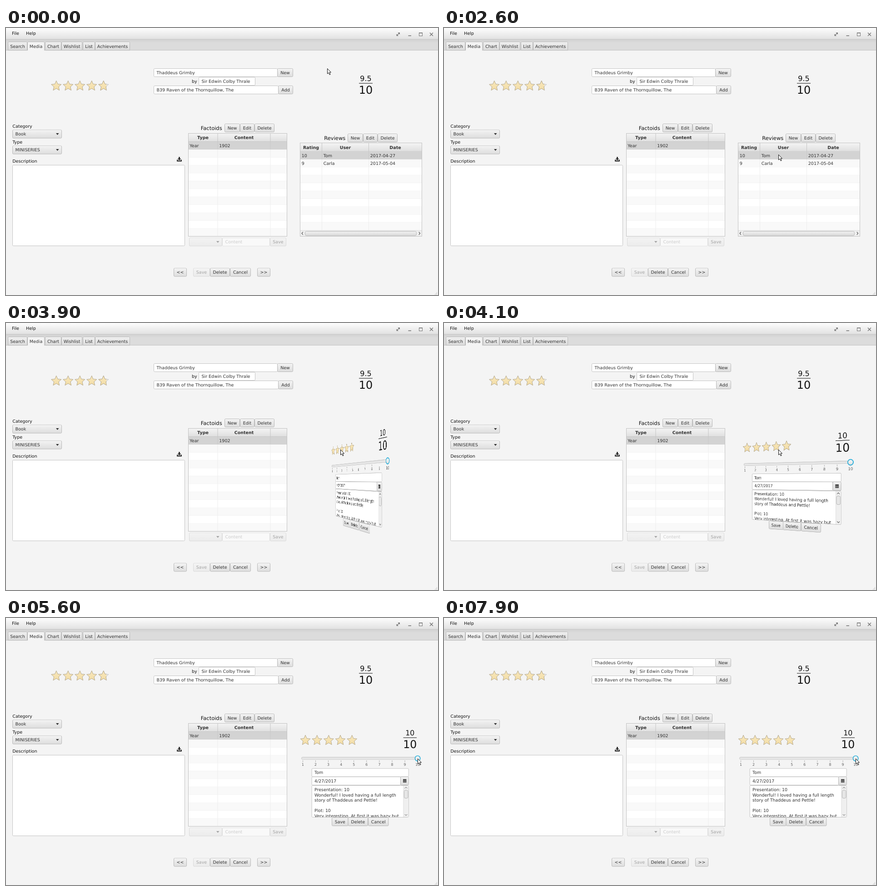
Write an HTML page with a canvas that moves like this. It is 951x589 px and loops after 8 s.

```html
<!DOCTYPE html>
<html lang="en">
<head>
<meta charset="utf-8">
<title>Media review form</title>
<style>
html, body { margin: 0; width: 100%; height: 100%; overflow: hidden; background: #f4f4f4; }
canvas { display: block; }
</style>
</head>
<body>
<canvas id="stage" width="951" height="589"></canvas>
<script>
const LOOP = 8000, STEP = 100;
const INK = '#323232', BLUE = '#2fb0da', FONT = '"DejaVu Sans", sans-serif';
const PANEL = { x: 647, y: 233, w: 269, h: 227 };
const ROW = 17.4;

const stage = document.getElementById('stage').getContext('2d');
const sheet = document.createElement('canvas');
sheet.width = PANEL.w * 2;
sheet.height = PANEL.h * 2;
const sheetCtx = sheet.getContext('2d');
let c = stage;

// ---------- basics ----------
function text(s, x, y, { size = 9.5, align = 'left', color = '#111', bold = false } = {}) {
  c.font = (bold ? 'bold ' : '') + size + 'px ' + FONT;
  c.textRendering = 'geometricPrecision';
  c.textAlign = align;
  c.fillStyle = color;
  c.fillText(s, x, y + size * 0.365);
}

function vgrad(y0, y1, ...colors) {
  const g = c.createLinearGradient(0, y0, 0, y1);
  colors.forEach((col, i) => g.addColorStop(i / (colors.length - 1), col));
  return g;
}

function rect(x0, y0, x1, y1, fill) {
  c.fillStyle = fill;
  c.fillRect(x0, y0, x1 - x0, y1 - y0);
}

function box(x0, y0, x1, y1, fill, edge = '#bdbdbd', r = 2) {
  c.beginPath();
  c.roundRect(x0 + 0.5, y0 + 0.5, x1 - x0 - 1, y1 - y0 - 1, r);
  c.fillStyle = fill;
  c.fill();
  c.strokeStyle = edge;
  c.lineWidth = 1;
  c.stroke();
}

function line(color, width, ...pts) {
  c.beginPath();
  for (let i = 0; i < pts.length; i += 2) c.lineTo(pts[i], pts[i + 1]);
  c.strokeStyle = color;
  c.lineWidth = width;
  c.stroke();
}

function poly(color, ...pts) {
  c.beginPath();
  for (let i = 0; i < pts.length; i += 2) c.lineTo(pts[i], pts[i + 1]);
  c.closePath();
  c.fillStyle = color;
  c.fill();
}

function faded(draw) {
  c.save();
  c.globalAlpha = 0.4;
  draw();
  c.restore();
}

// ---------- controls ----------
function plate(x0, y0, x1, y1) {
  box(x0, y0, x1, y1, vgrad(y0, y1, '#f3f3f3', '#dddddd'), '#b9b9b9');
  line('rgba(255,255,255,.8)', 1, x0 + 2, y0 + 1.5, x1 - 2, y0 + 1.5);
}

function button(x0, x1, y, label) {
  plate(x0, y - 9.5, x1, y + 9.5);
  text(label, (x0 + x1) / 2, y, { align: 'center', color: INK });
}

function combo(x0, x1, y, label) {
  plate(x0, y - 9.5, x1, y + 9.5);
  text(label, x0 + 6.5, y, { color: INK });
  poly(INK, x1 - 13, y - 2, x1 - 6.5, y - 2, x1 - 9.75, y + 2);
}

function field(x0, x1, y, label, color = INK) {
  box(x0, y - 9.5, x1, y + 9.5, '#fff', '#c4c4c4');
  text(label, x0 + 6.5, y, { color });
}

function starPath(x, y) {
  c.beginPath();
  for (let i = 0; i < 10; i++) {
    const a = i * Math.PI / 5 - Math.PI / 2, r = i % 2 ? 5.4 : 11.6;
    c.lineTo(x + r * Math.cos(a), y + r * Math.sin(a));
  }
  c.closePath();
}

function starSkin(x, y, fill, edge) {
  starPath(x, y);
  c.fillStyle = fill;
  c.fill();
  c.lineJoin = 'round';
  c.strokeStyle = edge;
  c.lineWidth = 1;
  c.stroke();
  c.lineJoin = 'miter';
}

function stars(x, y, score) {
  for (let i = 0; i < 5; i++, x += 26) {
    const part = Math.max(0, Math.min(1, score / 2 - i));
    if (part < 1) starSkin(x, y, vgrad(y - 11, y + 10, '#f6f6f6', '#e6e6e6'), '#c3c3c3');
    if (part <= 0) continue;
    c.save();
    c.beginPath();
    c.rect(x - 13, y - 14, 26 * part, 28);
    c.clip();
    starSkin(x, y, vgrad(y - 11, y + 10, '#f8e8bd', '#f3dca4'), '#b3a78c');
    c.restore();
  }
}

function fraction(x, y, score) {
  text(score, x, y, { size: 16, align: 'center' });
  rect(x - 15, y + 10, x + 15, y + 11, '#111');
  text('10', x, y + 25, { size: 24, align: 'center' });
}

// cols: column edges; heads and rows: texts per column
function table(x0, y0, x1, y1, cols, heads, rows, body, active) {
  rect(x0, y0, x1, y1, '#fff');
  const top = y0 + 19, edges = [x0, ...cols, x1];
  c.save();
  c.beginPath();
  c.rect(x0, y0, x1 - x0, body - y0);
  c.clip();
  for (let i = 0, y = top; y < body; i++, y += ROW) {
    const fill = i ? (i % 2 ? '#f9f9f9' : '#fff') : (active ? '#0096c9' : '#d3d3d3');
    rect(x0, y, x1, y + ROW, fill);
    if (i) rect(x0, y + ROW - 0.7, x1, y + ROW, '#efefef');
    cols.forEach(x => rect(x - 0.5, y, x + 0.5, y + ROW, i ? '#ededed' : active ? '#1aa3d2' : '#cacaca'));
    (rows[i] || []).forEach((s, k) =>
      text(s, edges[k] + 3.3, y + ROW / 2, { color: active && !i ? '#fff' : INK }));
  }
  rect(x0, y0, x1, top, vgrad(y0, top, '#f4f4f4', '#dfdfdf'));
  rect(x0, top - 0.8, x1, top, '#c4c4c4');
  cols.forEach(x => rect(x - 0.5, y0, x + 0.5, top, '#c4c4c4'));
  heads.forEach((s, k) =>
    text(s, (edges[k] + edges[k + 1]) / 2, y0 + 10, { align: 'center', bold: true, color: INK }));
  c.restore();
}

function frame(x0, y0, x1, y1, color, width) {
  c.strokeStyle = color;
  c.lineWidth = width;
  c.strokeRect(x0 + 0.5, y0 + 0.5, x1 - x0 - 1, y1 - y0 - 1);
}

// ---------- window ----------
function chrome() {
  rect(0, 0, 951, 589, '#f4f4f4');
  rect(0, 0, 951, 25, vgrad(0, 25, '#fdfdfd', '#e1e1e1'));
  rect(0, 25, 951, 49, vgrad(25, 49, '#d2d2d2', '#dcdcdc', '#dcdcdc', '#dcdcdc'));
  rect(0, 24.5, 951, 25.5, '#c6c6c6');
  rect(0, 48.5, 951, 49.5, '#c2c2c2');
  text('File', 13, 11.5);
  text('Help', 44, 11.5);

  const icon = '#777';
  line(icon, 1.2, 860.5, 16.5, 866, 11);
  poly(icon, 862.5, 10, 867, 10, 867, 14.5);
  poly(icon, 859.5, 13, 859.5, 17.5, 864, 17.5);
  line(icon, 1.6, 885.5, 17, 892, 17);
  c.lineWidth = 1;
  c.strokeRect(909.5, 10.5, 7, 7);
  line(icon, 1.4, 909, 11, 917, 11);
  line(icon, 1.5, 933, 10.5, 940, 17.5);
  line(icon, 1.5, 940, 10.5, 933, 17.5);

  const tabs = [['Search', 4, 47], ['Media', 47, 85], ['Chart', 86, 122],
    ['Wishlist', 122, 168], ['List', 169, 196], ['Achievements', 196, 273]];
  tabs.forEach(([name, a, b], i) => {
    const on = i === 1;
    c.beginPath();
    c.roundRect(a + 0.5, 30.5, b - a - 1, 18.5, [2, 2, 0, 0]);
    c.fillStyle = on ? '#f4f4f4' : vgrad(30, 49, '#f0f0f0', '#dcdcdc');
    c.fill();
    c.strokeStyle = '#b9b9b9';
    c.lineWidth = 1;
    c.stroke();
    if (on) rect(a + 1, 47, b - 1, 50, '#f4f4f4');
    text(name, (a + b) / 2, 40.3, { align: 'center', color: INK });
  });

  for (let i = 0; i < 3; i++)
    for (let k = 0; k <= i; k++) rect(948 - k * 2, 583 + i * 2, 949 - k * 2, 584 + i * 2, '#aaa');
}

function form() {
  stars(110.7, 128, 9.5);
  fraction(792, 111.5, '9.5');

  field(325, 598, 98.5, 'Thaddeus Grimby');
  button(597, 632, 98.5, 'New');
  text('by', 409, 117.5);
  field(424, 549, 117.5, 'Sir Edwin Colby Thrale');
  field(325, 600, 136.5, 'B39 Raven of the Thornquillow, The');
  button(599, 632, 136.5, 'Add');

  text('Category', 14.3, 217);
  combo(14, 123, 234, 'Book');
  text('Type', 14.3, 251.3);
  combo(14, 123, 269, 'MINISERIES');
  text('Description', 14.3, 294);
  box(14, 302, 394, 481, '#fff', '#c4c4c4');

  const dark = '#2b2b2b';
  rect(380, 284.5, 383, 288.5, dark);
  poly(dark, 377.5, 288, 385.5, 288, 381.5, 292);
  line(dark, 2.2, 377.2, 290.5, 377.2, 293.4, 385.8, 293.4, 385.8, 290.5);

  text('Factoids', 428.7, 220.5, { size: 11.5 });
  button(481, 515, 220.5, 'New');
  button(515, 547, 220.5, 'Edit');
  button(547, 591, 220.5, 'Delete');
  table(401, 232, 619, 460, [466, 582], ['Type', 'Content'], [['Year', '1902']], 460, false);
  frame(401, 232, 619, 460, '#c2c2c2', 1);

  faded(() => combo(403, 476, 472, ''));
  faded(() => field(476, 581, 472, 'Content', '#8a8a8a'));
  faded(() => button(581, 617, 472, 'Save'));

  button(369, 398, 539, '<<');
  faded(() => button(412, 449, 539, 'Save'));
  button(449, 493, 539, 'Delete');
  button(493, 539, 539, 'Cancel');
  button(553, 582, 539, '>>');
}

// ---------- the two sides of the review panel ----------
function reviews(active) {
  text('Reviews', 700.3, 242.5, { size: 11.5 });
  button(752, 786, 242.5, 'New');
  button(786, 818, 242.5, 'Edit');
  button(818, 862, 242.5, 'Delete');
  table(647.5, 253.5, 915.5, 459.5, [695.5, 798.5], ['Rating', 'User', 'Date'],
    [['10', 'Tom', '2017-04-27'], ['9', 'Carla', '2017-05-04']], 446.5, active);
  rect(648, 446.5, 915, 459, '#efefef');
  rect(648, 446.5, 915, 447.3, '#d4d4d4');
  box(658, 448, 904, 458.5, vgrad(448, 458, '#f2f2f2', '#dadada'), '#b9b9b9', 3);
  line('#555', 1.1, 653.8, 450, 651, 453, 653.8, 456);
  line('#555', 1.1, 908.8, 450, 911.6, 453, 908.8, 456);
  frame(647, 253, 916, 460, active ? BLUE : '#c2c2c2', active ? 1.6 : 1);
}

function editor(score) {
  c.save();
  if (score === 10) {
    // full score overflows a little, so the side is squeezed
    c.translate(648, 0);
    c.scale(0.987, 1);
    c.translate(-648, 0);
  }
  stars(659.2, 270, score);
  fraction(892.5, 253.5, String(score));

  box(650, 306.5, 912, 312.5, vgrad(306, 313, '#dcdcdc', '#f2f2f2'), '#c6c6c6', 2.5);
  const mark = v => 653.5 + (v - 1) * 28.45;
  for (let v = 1; v <= 10; v++) {
    rect(mark(v) - 0.4, 314, mark(v) + 0.4, 318, '#a0a0a0');
    text(v, mark(v), 323.3, { size: 8, align: 'center', color: '#5c5c5c' });
  }
  c.beginPath();
  c.arc(mark(score), 309.8, 5.8, 0, 7);
  c.fillStyle = vgrad(304, 316, '#f8f8f8', '#dedede');
  c.fill();
  c.strokeStyle = BLUE;
  c.lineWidth = 1.7;
  c.stroke();

  field(673, 890, 341, 'Tom');
  field(673, 872, 359.5, '4/27/2017');
  plate(871, 350, 890, 369);
  rect(877, 355.5, 884.5, 363, '#444');
  for (let i = 0; i < 6; i++) {
    const x = 878 + (i % 3) * 2.1, y = 358.3 + (i / 3 | 0) * 2.2;
    rect(x, y, x + 1.1, y + 1.1, '#ddd');
  }

  box(673, 369, 890, 440, '#fff', '#c4c4c4');
  c.save();
  c.beginPath();
  c.rect(674, 370, 203, 69);
  c.clip();
  ['Presentation: 10', 'Wonderful! I loved having a full length', 'story of Thaddeus and Pettle!',
    '', 'Plot: 10', 'Very interesting. At first it was hazy but']
    .forEach((s, i) => text(s, 679.5, 378.6 + i * 11.5, { color: INK }));
  c.restore();
  rect(878, 370, 889, 439, '#efefef');
  rect(877.5, 370, 878.2, 439, '#d4d4d4');
  box(879, 379.5, 888.5, 398, '#e6e6e6', '#b9b9b9', 2.5);
  line('#555', 1, 880.8, 375.8, 883.6, 373, 886.4, 375.8);
  line('#555', 1, 880.8, 433, 883.6, 435.8, 886.4, 433);

  button(718, 755, 449.5, 'Save');
  button(754, 799, 449.5, 'Delete');
  button(799, 845, 449.5, 'Cancel');
  c.restore();
}

// ---------- motion ----------
const FLIP_START = 3275, FLIP_TIME = 945;

function flip(t) {
  const turn = Math.PI * (t - FLIP_START) / FLIP_TIME;
  const front = turn < Math.PI / 2;
  const { x, y, w, h } = PANEL;

  c = sheetCtx;
  c.setTransform(2, 0, 0, 2, -2 * x, -2 * y);
  c.clearRect(x, y, w, h);
  if (front) reviews(true); else editor(10);
  c = stage;

  const half = Math.abs(Math.cos(turn)) * w / 2, depth = Math.sin(turn) * 0.2;
  const left = x + w / 2 - half, right = x + w / 2 + half;
  const a = front ? 1 + depth : 1 - depth, b = 2 - a;
  const place = px => (px - left) / (right - left);
  const source = s => s * b / (s * b + (1 - s) * a) * sheet.width;
  for (let px = Math.floor(left); px < right; px++) {
    const p0 = Math.max(px, left), p1 = Math.min(px + 1, right);
    const u0 = source(place(p0)), u1 = source(place(p1));
    const k = a + (b - a) * place((p0 + p1) / 2);
    c.drawImage(sheet, u0, 0, u1 - u0, sheet.height, p0, y + h / 2 * (1 - k), p1 - p0, h * k);
  }
}

// time, x, y
const PATH = [
  [200, 707, 89], [500, 669, 190], [700, 700, 270], [900, 775, 295], [1100, 845, 282],
  [1300, 920, 305], [1400, 940, 350], [1600, 830, 437], [1800, 659, 375], [1900, 685, 315],
  [2000, 741, 292], [2600, 736, 279], [4100, 736, 279], [4600, 761, 295], [4800, 920, 313],
  [4900, 920, 313], [5200, 937, 315], [5400, 903, 314], [5600, 906, 310]
];

function pointer(t) {
  let i = PATH.findIndex(p => p[0] > t);
  if (i === 0) return PATH[0].slice(1);
  if (i < 0) return PATH[PATH.length - 1].slice(1);
  const [t0, x0, y0] = PATH[i - 1], [t1, x1, y1] = PATH[i], f = (t - t0) / (t1 - t0);
  return [Math.round(x0 + (x1 - x0) * f), Math.round(y0 + (y1 - y0) * f)];
}

function cursor(x, y) {
  c.save();
  c.translate(x + 0.5, y + 0.5);
  poly('#fff', 0, 0, 0, 11.5, 2.7, 9, 4.7, 13.6, 6.6, 12.8, 4.6, 8.3, 8, 8.3);
  c.strokeStyle = '#111';
  c.lineWidth = 1;
  c.stroke();
  c.restore();
}

// the score drops at the first times and rises at the second
const DOWN = [6100, 6400, 6600, 6800, 7000], UP = [7200, 7400, 7500, 7700, 7900];
const passed = (times, t) => times.filter(v => v <= t).length;

function paint(t) {
  c = stage;
  chrome();
  form();
  if (t < 3300) reviews(t >= 3000);
  else if (t < 4200) flip(t);
  else editor(10 - passed(DOWN, t) + passed(UP, t));
  cursor(...pointer(t));
}

const begin = performance.now();
let shown = -1;
function tick() {
  const t = Math.floor((performance.now() - begin) % LOOP / STEP) * STEP;
  if (t !== shown) paint(shown = t);
  requestAnimationFrame(tick);
}
tick();
</script>
</body>
</html>
```
